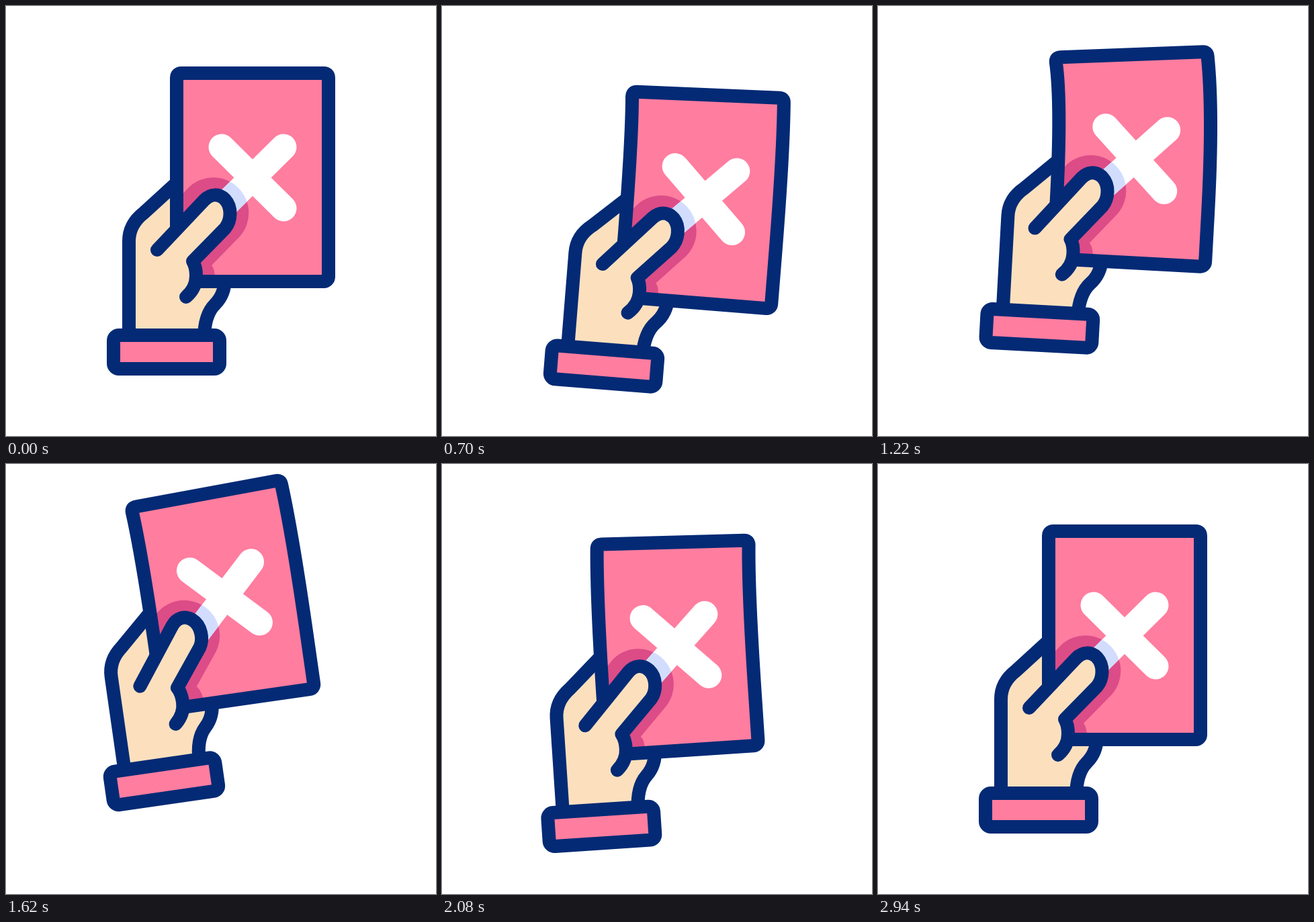
An HTML page with a canvas for the animation above (3000 ms loop, 640 by 640 pixels).

```html
<!DOCTYPE html>
<html lang="en">
<head>
<meta charset="utf-8">
<title>Hand holding up a card</title>
<style>
  html, body { margin: 0; width: 100%; height: 100%; overflow: hidden; background: #fff; }
  canvas { display: block; width: 100vmin; height: 100vmin; }
</style>
</head>
<body>
<canvas id="stage" width="640" height="640"></canvas>
<script>
const ctx = document.getElementById('stage').getContext('2d');
const LOOP = 3000;
const NAVY = '#042a75', PINK = '#ff7d9f', SKIN = '#fce0be', SHADE = '#dc4c87', PALE = '#d2ddfe';
const RAD = Math.PI / 180;

const clamp = x => Math.min(1, Math.max(0, x));
const smooth = x => x * x * (3 - 2 * x);
const ramp = (t, from, to) => smooth(clamp((t - from) / (to - from)));

// Steeper than smooth: leaves quickly and settles for a long time.
function settle(x) {
  let low = 0, high = 1, s;
  for (let i = 0; i < 24; i++) {
    s = (low + high) / 2;
    const at = 0.6 * s * (1 - s) ** 2 + 0.5 * s * s * (1 - s) + s ** 3;
    if (at < x) low = s; else high = s;
  }
  return smooth(s);
}

// Vertical offset: dip, long rise, drop, small rebound, rest.
const lift = t => 58 * ramp(t, 200, 460) - 101 * settle(clamp((t - 460) / 1180))
  + 70 * ramp(t, 1640, 2140) - 38 * ramp(t, 2140, 2380) + 11 * ramp(t, 2380, 2880);

// Rotation in degrees: quick even swings, then slower ones that die away.
function swing(t) {
  let angle = 0, time = 600;
  for (let n = 0; n < 8; n++) {
    const span = n < 5 ? 240 : 360;
    const peak = n => n < 0 || n > 6 ? 0 : (n < 5 ? 12 : 18 - 2.4 * n) * (-1) ** n;
    angle += (peak(n) - peak(n - 1)) * ramp(t, time, time + span);
    time += span;
  }
  return angle;
}

// The top of the card and the thumb trail behind the swing.
const bend = t => 0.6 * (swing(t - 60) - swing(t));
const thumbTurn = t => 0.8 * swing(t - 70) - 0.055 * lift(t);

function turnAbout(x, y, degrees) {
  ctx.translate(x, y);
  ctx.rotate(degrees * RAD);
  ctx.translate(-x, -y);
}

function paint(path, fill, stroke, width = 20) {
  ctx.lineWidth = width;
  if (fill) { ctx.fillStyle = fill; ctx.fill(path); }
  if (stroke) { ctx.strokeStyle = stroke; ctx.stroke(path); }
}

const backEdge = 'M183 495V350Q183 325 205 308L263 255';
const wristEdge = '326 405Q326 429 311 444Q295 460 295 495';
const palm = new Path2D(backEdge + 'L' + wristEdge);
const palmEdge = new Path2D(backEdge + 'M' + wristEdge);
const palmFront = new Path2D('M225 363L278 380L283 402L268 433H215Z');
const cross = new Path2D('M321 210L413 301M413 210L321 301');
const shadow = new Path2D('M234 310L274 268A52.8 52.8 0 0 1 348 343L306 386Q312 392 311 415H250Z');
const cuff = new Path2D();
cuff.roundRect(160, 490, 158, 50, 8);

// The top edge leans by the given angle and the sides curve up to it.
function cardPath(degrees) {
  const c = Math.cos(degrees * RAD), s = Math.sin(degrees * RAD);
  const lean = (x, y) => [367 + (x - 367) * c - (y - 245) * s, 245 + (x - 367) * s + (y - 245) * c];
  const p = new Path2D();
  p.moveTo(367, 410);
  p.arcTo(480, 410, 480, 330, 7);
  p.lineTo(480, 330);
  p.quadraticCurveTo(480, 180, ...lean(480, 107));
  p.quadraticCurveTo(...lean(480, 100), ...lean(473, 100));
  p.lineTo(...lean(261, 100));
  p.quadraticCurveTo(...lean(254, 100), ...lean(254, 107));
  p.quadraticCurveTo(254, 180, 254, 330);
  p.arcTo(254, 410, 367, 410, 7);
  p.closePath();
  return p;
}

function drawCard(bendAngle, thumbAngle) {
  const card = cardPath(bendAngle);
  const turned = new Path2D();
  turned.addPath(shadow, new DOMMatrix().translate(278, 380).rotate(thumbAngle).translate(-278, -380));
  paint(card, PINK);
  ctx.save();
  ctx.clip(card);
  paint(turned, SHADE);
  paint(cross, null, '#fff', 39);
  ctx.clip(turned);
  paint(cross, null, PALE, 39);
  ctx.restore();
  paint(card, null, NAVY);
}

function drawThumb(angle) {
  ctx.beginPath();
  ctx.save();
  turnAbout(278, 380, angle);
  ctx.moveTo(225, 363);
  ctx.lineTo(295, 289);
  ctx.bezierCurveTo(305, 279, 317, 279, 326, 288);
  ctx.bezierCurveTo(337, 300, 335, 320, 326, 331);
  ctx.lineTo(278, 380);
  ctx.restore();
  ctx.quadraticCurveTo(283, 388, 283, 402);
  ctx.quadraticCurveTo(283, 420, 268, 433);
  ctx.fillStyle = SKIN;
  ctx.fill();
  ctx.lineWidth = 20;
  ctx.strokeStyle = NAVY;
  ctx.stroke();
}

function draw(t) {
  const thumbAngle = thumbTurn(t);
  ctx.fillStyle = '#fff';
  ctx.fillRect(0, 0, 640, 640);
  ctx.save();
  ctx.lineCap = ctx.lineJoin = 'round';
  ctx.translate(0, lift(t));
  turnAbout(239, 540, swing(t));
  paint(palm, SKIN);
  paint(palmEdge, null, NAVY);
  drawCard(bend(t), thumbAngle);
  paint(palmFront, SKIN);
  drawThumb(thumbAngle);
  paint(cuff, PINK, NAVY);
  ctx.restore();
}

const start = performance.now();
function tick() {
  draw((performance.now() - start) % LOOP);
  requestAnimationFrame(tick);
}
tick();
</script>
</body>
</html>
```
